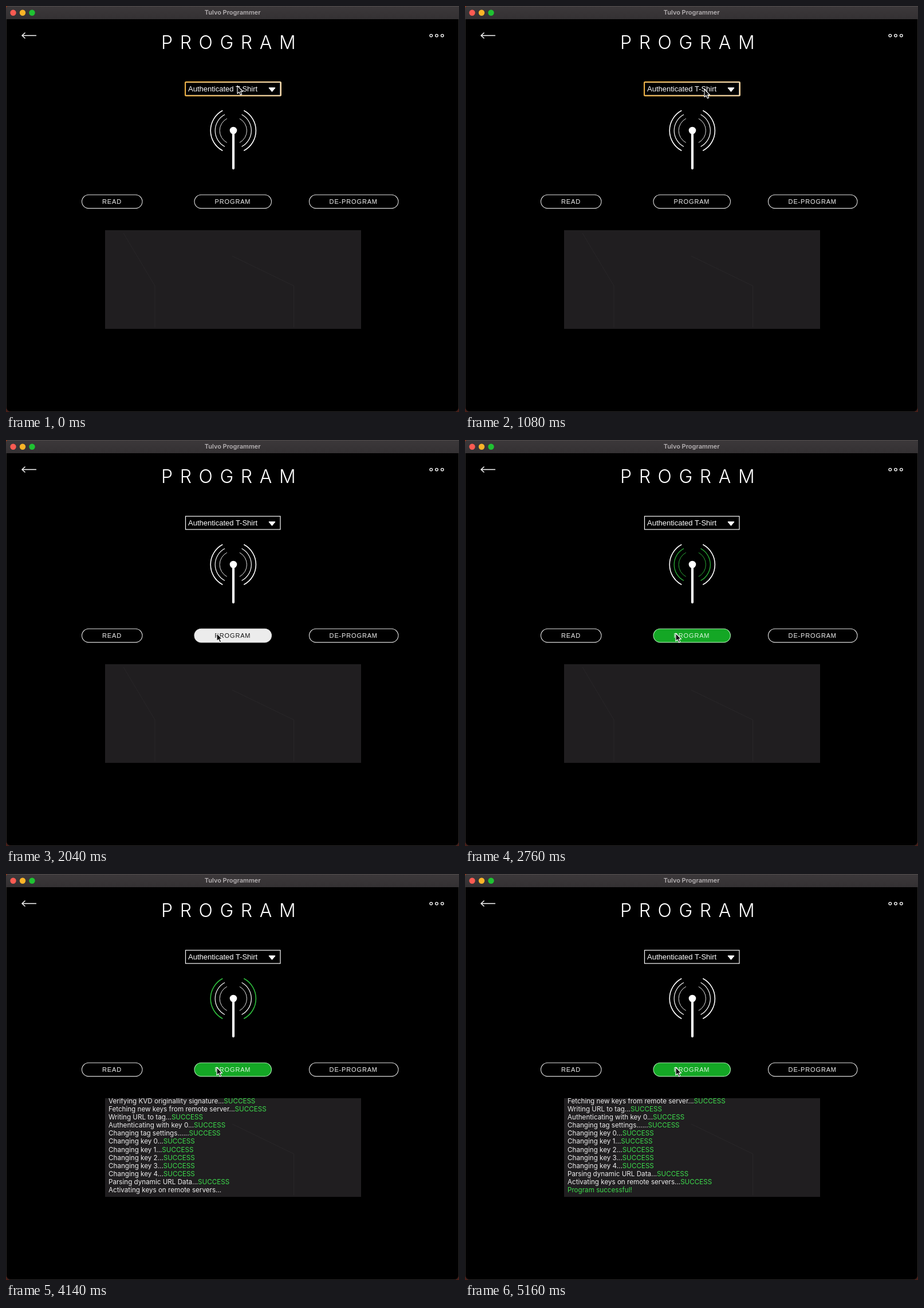
These frames come from a looping animation (791x708 px, 5.22 s). An HTML page:

```html
<!DOCTYPE html>
<html lang="en">
<head>
<meta charset="utf-8">
<title>Tag programmer</title>
<style>
  html, body { margin: 0; width: 100%; height: 100%; overflow: hidden; background: #000; }
  svg { display: block; width: 791px; height: 708px; }
  .title { font: 600 11px Inter, sans-serif; fill: #b5b1b3; text-anchor: middle; }
  .heading { font: 300 32px Inter, sans-serif; letter-spacing: 12.6px; fill: #fff; }
  .choice { font: 13px "Liberation Sans", Arial, sans-serif; fill: #fff; }
  .label { font: 11px "Liberation Sans", Arial, sans-serif; letter-spacing: .85px; fill: #f2f2f2; }
  .log { font: 11.65px Inter, sans-serif; fill: #eee; }
  .log .ok { fill: #3ddc4c; }
  .line { fill: none; stroke: #fff; }
  .pill { fill: #000; stroke: #e0e0e0; stroke-width: 1.1; }
  .hover .pill { fill: #ececec; }
  .hover .label { fill: #111; }
  .active .pill { fill: #14a725; stroke: #a5e5ab; }
  .active .label { fill: #dcf6df; }
</style>
</head>
<body>
<svg viewBox="0 0 791 708" xmlns="http://www.w3.org/2000/svg">
  <defs>
    <linearGradient id="bar" x2="0" y2="1">
      <stop stop-color="#3c383a"/><stop offset="1" stop-color="#343133"/>
    </linearGradient>
    <linearGradient id="ring" gradientUnits="userSpaceOnUse" x1="312" y1="0" x2="481" y2="0">
      <stop stop-color="#eeb040"/><stop offset="1" stop-color="#f4d4a0"/>
    </linearGradient>
    <clipPath id="panel"><rect x="173" y="391" width="447" height="172"/></clipPath>
  </defs>

  <rect width="791" height="708"/>
  <path d="M.5 23V699Q.5 707.5 9 707.5H782Q790.5 707.5 790.5 699V23" fill="none" stroke="#2c292a"/>
  <path d="M0 698V708H10Q0 708 0 698ZM791 698V708H781Q791 708 791 698Z" fill="#4a1f18"/>
  <rect width="791" height="23" fill="url(#bar)"/>
  <path d="M0 .5H791" stroke="#55504f"/>
  <path d="M0 0H4Q0 0 0 5Z" fill="#a33a18"/>
  <circle cx="12.5" cy="11.8" r="5.2" fill="#fc5b52"/>
  <circle cx="29" cy="11.8" r="5.2" fill="#fbb428"/>
  <circle cx="45.5" cy="11.8" r="5.2" fill="#1fc232"/>
  <text class="title" x="395.7" y="15">Tulvo Programmer</text>

  <path class="line" d="M53 51.5H28M33.5 46.5L28 51.5L33.5 56.5" stroke-width="1.4"/>
  <g class="line" stroke-width="1.3">
    <circle cx="742.3" cy="51.6" r="2.3"/><circle cx="752" cy="51.6" r="2.3"/><circle cx="761.8" cy="51.6" r="2.3"/>
  </g>
  <text class="heading" x="271" y="74.7">PROGRAM</text>

  <rect class="line" x="313.5" y="133" width="165.5" height="23" stroke-width="1.2"/>
  <rect id="focus" x="313" y="132.5" width="167" height="24" rx="1.5" fill="none" stroke="url(#ring)" stroke-width="2"/>
  <text class="choice" x="318" y="149.3">Authenticated T-Shirt</text>
  <path d="M459.5 142.8H469.5L464.5 148.8Z" fill="#fff" stroke="#fff" stroke-width="1.6" stroke-linejoin="round"/>

  <g id="waves" class="line" stroke-linecap="round"></g>
  <path d="M397 217V283" stroke="#fff" stroke-width="4.2" stroke-linecap="round"/>
  <circle cx="397" cy="217" r="6.3" fill="#fff"/>

  <g id="buttons"></g>

  <rect x="173" y="391" width="447" height="172" fill="#201e20"/>
  <path id="trace" d="M205 396L260 488V560" fill="none" stroke="#282628"/>
  <path d="M395 436L502.5 488V560" fill="none" stroke="#292729"/>
  <g clip-path="url(#panel)"><g id="log" class="log"></g></g>

  <path id="cursor" d="M0 0V13.8L3.1 11L5.4 16L7.8 14.9L5.5 10.1H9.6Z" fill="#111" stroke="#fff" stroke-width="1.1" stroke-linejoin="round"/>
</svg>
<script>
const LOOP = 5220, STEP = 60;
const FOCUS_END = 1560, RUN_START = 2370, RUN_END = 4800, WAVE_STEP = 160;
const LINE_HEIGHT = 14.17, FIRST_BASELINE = 402.7, LAST_BASELINE = 555.4;
const WAVE_X = 396.8, WAVE_Y = 217.3, WAVE_ANGLE = 1.07;

// time, x, y of the pointer tip
const path = [[0, 404, 139], [60, 404, 139], [540, 418, 145], [1080, 418, 145],
  [1440, 392, 332], [1620, 386, 343], [1980, 368, 337], [LOOP, 368, 337]];

// start time, text; each line succeeds when the next one begins
const steps = [
  [3240, 'Checking for existing tag data...'],
  [3360, 'Verifying KVD originallity signature...'],
  [3540, 'Fetching new keys from remote server...'],
  ...['Writing URL to tag...', 'Authenticating with key 0...', 'Changing tag settings......',
    ...[0, 1, 2, 3, 4].map(n => `Changing key ${n}...`),
    'Parsing dynamic URL Data...', 'Activating keys on remote servers...'
  ].map((text, i) => [3780 + 40 * i, text]),
  [4560, 'Program successful!']
];

const $ = id => document.getElementById(id);
function add(parent, tag, attrs, text = '') {
  const el = document.createElementNS('http://www.w3.org/2000/svg', tag);
  for (const name in attrs) el.setAttribute(name, attrs[name]);
  el.textContent = text;
  return parent.appendChild(el);
}

// radius and stroke width of each ring
const waves = [[23.7, .9], [31.6, 1.2], [39.6, 1.6]].map(([r, width]) => {
  const dx = r * Math.cos(WAVE_ANGLE), dy = r * Math.sin(WAVE_ANGLE);
  const arc = (side, sweep) =>
    `M${WAVE_X + side * dx} ${WAVE_Y - dy}A${r} ${r} 0 0 ${sweep} ${WAVE_X + side * dx} ${WAVE_Y + dy}`;
  return add($('waves'), 'path', { d: arc(1, 1) + arc(-1, 0), 'stroke-width': width });
});

const buttons = [['READ', 132.5, 105.5, 168], ['PROGRAM', 329, 134.5, 364.6], ['DE-PROGRAM', 529.5, 155.5, 564.6]]
  .map(([name, x, width, textX]) => {
    const group = add($('buttons'), 'g', {});
    add(group, 'rect', { class: 'pill', x, y: 329.3, width, height: 23.6, rx: 11.8 });
    add(group, 'text', { class: 'label', x: textX, y: 345 }, name);
    return group;
  });

const last = steps.length - 1;
const lines = steps.map(([start, text], i) => {
  const el = add($('log'), 'text', { x: 179, y: FIRST_BASELINE + i * LINE_HEIGHT }, text);
  if (i === last) el.setAttribute('class', 'ok');
  const result = i < last && add(el, 'tspan', { class: 'ok' }, 'SUCCESS');
  return { el, result, start, done: i < last ? steps[i + 1][0] : LOOP };
});

const show = (el, on) => { el.style.display = on ? '' : 'none'; };

function pointerAt(t) {
  const i = path.findIndex(p => p[0] > t);
  const [t0, x0, y0] = path[i - 1], [t1, x1, y1] = path[i];
  const u = (t - t0) / (t1 - t0), k = u * u * (3 - 2 * u);
  return [x0 + (x1 - x0) * k, y0 + (y1 - y0) * k];
}

function draw(t) {
  const [x, y] = pointerAt(t);
  $('cursor').setAttribute('transform', `translate(${x} ${y})`);
  show($('focus'), t < FOCUS_END);
  buttons[1].setAttribute('class', t >= RUN_START ? 'active' : y > 329 ? 'hover' : '');

  // the rings light up from the inside, then go out in the same order
  const phase = t >= RUN_START && t < RUN_END ? Math.floor((t - RUN_START) / WAVE_STEP) % 6 : 0;
  waves.forEach((wave, i) => wave.setAttribute('stroke', phase > i && phase < i + 4 ? '#2fbd3d' : '#fff'));

  let count = 0;
  for (const { el, result, start, done } of lines) {
    show(el, t >= start);
    if (result) show(result, t >= done);
    if (t >= start) count++;
  }
  const bottom = FIRST_BASELINE + (count - 1) * LINE_HEIGHT;
  $('log').setAttribute('transform', `translate(0 ${Math.min(0, LAST_BASELINE - bottom)})`);
  show($('trace'), count < 4);
}

function tick() {
  draw(Math.floor(performance.now() % LOOP / STEP) * STEP);
  requestAnimationFrame(tick);
}
tick();
</script>
</body>
</html>
```
